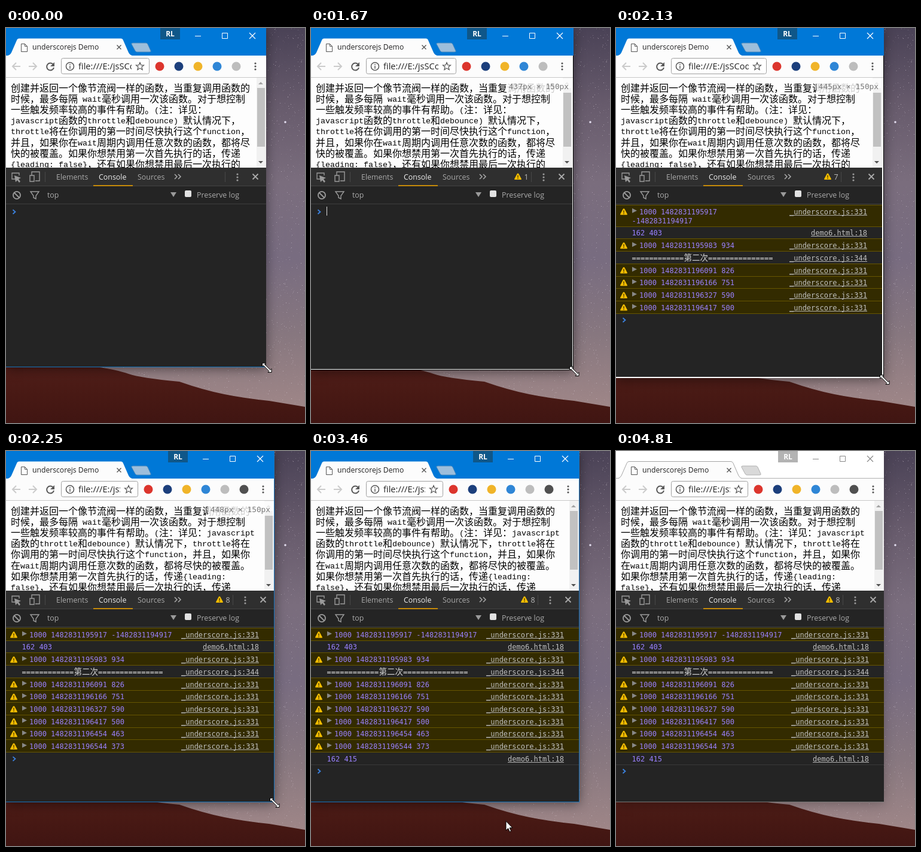
Animation, 500 px wide and 659 px high, one loop 4.91 s. Source, as an HTML page with a canvas:

```html
<!DOCTYPE html>
<html lang="zh-CN">
<head>
<meta charset="utf-8">
<title>underscorejs Demo</title>
<style>
html, body { margin: 0; width: 100%; height: 100%; overflow: hidden; background: #242424; }
canvas { display: block; }
</style>
</head>
<body>
<canvas id="stage" width="500" height="659"></canvas>
<script>
const LOOP = 4910, ROW = 20.68;
const UI = '"Open Sans", "Noto Sans", sans-serif';
const MONO = '"DejaVu Sans Mono", monospace';
const CJK = '"Noto Sans CJK SC", "Noto Sans CJK", sans-serif';
const stage = document.getElementById('stage');
let c = stage.getContext('2d');

// Window stages: start, outer width/height, toolbar width, console width/bottom, log rows, warnings
const sizes = [
  [0, 435, 566, 435, 435, 565, 0, 0],
  [1550, 438, 569, 437, 435, 565, 0, 0],
  [1670, 439, 571, 438, 437, 569, 0, 1],
  [1820, 441, 579, 440, 439, 570, 3, 2],
  [1980, 447, 583, 442, 439, 572, 5, 4],
  [2130, 448, 584, 447, 445, 582, 8, 7],
  [2250, 448, 586, 448, 448, 585, 10, 8],
  [2650, 448, 586, 448, 448, 585, 11, 8]
];
// Pointer: start, x, y, shape
const pointer = [
  [0, 436.5, 567, 'resize'], [1550, 438.5, 569, 'resize'], [1670, 440.5, 573, 'resize'],
  [1820, 442.5, 580, 'resize'], [1980, 449.5, 587, 'resize'], [2780, 442, 609, 'arrow'],
  [2920, 430, 620, 'arrow'], [3050, 400, 631, 'arrow'], [3190, 352, 638, 'arrow'],
  [3310, 325, 621, 'arrow'], [3460, 326, 617, 'arrow'], [3580, 314, 631, 'arrow'],
  [3730, 0, 0, 'none']
];
const caretFlips = [460, 1020, 1550, 2080, 2650, 3050, 3580, 4040, 4560, 4810];

const logs = ['1000 1482831195917 -1482831194917', '162 403', '1000 1482831195983 934',
  '============第二次===============', '1000 1482831196091 826', '1000 1482831196166 751',
  '1000 1482831196327 590', '1000 1482831196417 500', '1000 1482831196454 463',
  '1000 1482831196544 373', '162 415'];
const head = ['创建并返回一个像节流阀一样的函数，当重复调用函数的',
  '时候，最多每隔 wait毫秒调用一次该函数。对于想控制'];
const narrowText = [...head,
  '一些触发频率较高的事件有帮助。(注：详见：',
  'javascript函数的throttle和debounce) 默认情况下，',
  'throttle将在你调用的第一时间尽快执行这个function，',
  '并且，如果你在wait周期内调用任意次数的函数，都将尽',
  '快的被覆盖。如果你想禁用第一次首先执行的话，传递',
  '{leading: false}，还有如果你想禁用最后一次执行的'];
const wideText = [...head,
  '一些触发频率较高的事件有帮助。(注：详见：javascript',
  '函数的throttle和debounce) 默认情况下，throttle将在',
  '你调用的第一时间尽快执行这个function，并且，如果你',
  '在wait周期内调用任意次数的函数，都将尽快的被覆盖。',
  '如果你想禁用第一次首先执行的话，传递{leading:',
  'false}，还有如果你想禁用最后一次执行的话，传递'];

const latest = (list, t) => list.filter(step => step[0] <= t).pop();

function rect(x, y, w, h, color) {
  c.fillStyle = color;
  c.fillRect(x, y, w, h);
}
function text(str, x, y, font, color, align = 'left') {
  c.font = font;
  c.fillStyle = color;
  c.textAlign = align;
  c.fillText(str, x, y);
}
function trace(d, x, y) {
  const path = new Path2D();
  path.addPath(new Path2D(d), new DOMMatrix([1, 0, 0, 1, x, y]));
  return path;
}
function stroke(d, x, y, color, width = 1) {
  c.strokeStyle = color;
  c.lineWidth = width;
  c.stroke(trace(d, x, y));
}
function fill(d, x, y, color) {
  c.fillStyle = color;
  c.fill(trace(d, x, y));
}
function disc(x, y, r, color) {
  c.fillStyle = color;
  c.beginPath();
  c.arc(x, y, r, 0, 7);
  c.fill();
}
function dots(x, y, color) {
  for (const dy of [-5, 0, 5]) disc(x, y + dy, 1.6, color);
}
function clipped(x, y, w, h, draw) {
  c.save();
  c.beginPath();
  c.rect(x, y, w, h);
  c.clip();
  draw();
  c.restore();
}
function gradient(y0, y1, colors) {
  const g = c.createLinearGradient(0, y0, 0, y1);
  colors.forEach((color, i) => g.addColorStop(i / (colors.length - 1), color));
  return g;
}

function makeDesktop() {
  const canvas = document.createElement('canvas'), front = c;
  canvas.width = 500;
  canvas.height = 659;
  c = canvas.getContext('2d');
  rect(0, 0, 500, 659, gradient(0, 640, ['#4a4256', '#675b6c', '#7a6d7d', '#786c80', '#87777f', '#a08788']));
  let seed = 7;
  const random = () => (seed = seed * 16807 % 2147483647) / 2147483647;
  for (let i = 0; i < 9000; i++) {
    const x = random() * 500, y = random() * 635, a = random() ** 3 * 0.5;
    rect(x | 0, y | 0, 1, 1, `rgba(235,225,235,${a})`);
  }
  disc(467, 157, 1.8, '#e6e0f2');
  fill('M0 560 L150 565 Q185 570 205 577 T290 590 Q330 604 365 611 T440 622 L500 632 V659 H0Z', 0, 0,
    gradient(566, 659, ['#4f1d18', '#481914', '#401512']));
  c = front;
  return canvas;
}

function drawTitleBar(O, W, active) {
  rect(0, 0, O, 46, active ? '#0078d7' : '#fff');
  const ink = active ? '#fff' : '#888';
  rect(O - 119, 13, 10, 1, ink);
  stroke('M-4.5 -4.5h9v9h-9z', O - 69, 13, ink);
  stroke('M-5 -5L5 5M5 -5L-5 5', O - 23, 13, ink, 1.2);
  rect(W - 177, 0, 33, 19, active ? '#0f5789' : '#b3b3b3');
  text('RL', W - 160.5, 14, 'bold 12px ' + UI, '#fff', 'center');

  const tab = 'M3 46 Q7 45 9 41 L18 20.5 Q19 17.5 22 17.5 H192 Q195 17.5 196 20.5 L205 41 Q207 45 211 46';
  const plus = 'M212 25 H234 Q236 25 237 27 L242 38 Q243 40 240 40 H219 Q217 40 216 38 L210 27 Q209 25 212 25Z';
  fill(plus, 0, 0, active ? '#9dbedb' : '#d9d9d9');
  stroke(plus, 0, 0, active ? '#4a89bd' : '#b0b0b0');
  if (!active) rect(0, 45, O, 1, '#b0b0b0');
  fill(tab, 0, 0, '#fcfcfc');
  if (!active) stroke(tab, 0, 0, '#a5a5a5');
  fill('M25 26h7l4 4v10h-11z', 0, 0, '#fff');
  stroke('M25.5 26.5h6l4 4v9h-10zM31.5 26.5v4h4', 0, 0, '#555');
  text('underscorejs Demo', 44, 36, '12.2px ' + UI, '#222');
  stroke('M-3.5 -3.5L3.5 3.5M3.5 -3.5L-3.5 3.5', 189, 32, '#555', 1.4);
}

function drawToolbar(W, wide) {
  rect(0, 46, W, 37, '#fcfcfc');
  rect(0, 82, W, 1, '#c8c8c8');
  stroke('M7 0H-6M0 -6L-6 0L0 6', 17, 64, '#cbcbcb', 2);
  stroke('M-7 0H6M0 -6L6 0L0 6', 45, 64, '#cbcbcb', 2);
  stroke('M5 -3A6 6 0 1 0 6 2', 74, 64, '#5a5a5a', 2);
  fill('M7 -7V0H0Z', 74, 64, '#5a5a5a');

  const icons = [...(wide ? ['#505050'] : []), '#bdbdbd', '#2f86d6', '#f0b429', '#1c3f7c', '#dc352d'];
  const right = W - 36 - 32 * icons.length;
  c.beginPath();
  c.roundRect(92.5, 50.5, right - 92, 26, 3);
  c.fillStyle = '#fff';
  c.fill();
  c.strokeStyle = '#a0a0a0';
  c.lineWidth = 1;
  c.stroke();
  stroke('M6.5 0A6.5 6.5 0 1 1 6.5 -.01M0 -1V4M0 -4V-2.3', 107, 64, '#555', 1.4);
  clipped(115, 51, right - 144, 25, () => text('file:///E:/jsSCode', 121, 69, '14.6px ' + UI, '#222'));
  stroke('M0 -6.5L1.8 -2.2 6.5 -2 2.9 1 4.1 5.6 0 3.1 -4.1 5.6 -2.9 1 -6.5 -2 -1.8 -2.2Z', right - 15, 64, '#555', 1.2);
  icons.forEach((color, i) => disc(W - 50 - 32 * i, 64, 7.5, color));
  dots(W - 18, 64, '#555');
}

function drawPage(V, top, wide, overlay) {
  rect(0, 83, V, top - 83, '#fdfdfd');
  clipped(0, 83, V, top - 83, () => {
    (wide ? wideText : narrowText).forEach((line, row) => {
      let x = 8;
      for (const ch of line) {
        const latin = ch < '\x7f';
        text(ch, x, (latin ? 105 : 106) + row * 18.1, latin ? '13.33px "Liberation Mono", monospace' : '16px ' + CJK, '#000');
        x += latin ? 8 : 16;
      }
    });
    rect(V - 16, 83, 16, 150, '#f1f1f1');
    rect(V - 15, 100, 13, 98, '#c1c1c1');
    fill('M-4 2L0 -2L4 2Z', V - 9, 92, '#a3a3a3');
    fill('M-4 -2L0 2L4 -2Z', V - 9, 224, '#505050');
    if (overlay) {
      rect(V - 110, 84, 110, 24, 'rgba(255,255,255,.8)');
      text(`${V}px × ${top - 83}px`, V - 6, 102, '12.8px ' + MONO, '#777', 'right');
    }
  });
}

function warning(x, y) {
  fill('M0 -5.5Q1 -5.5 1.5 -4.5L6 4Q6 5 5 5H-5Q-6 5 -6 4L-1.5 -4.5Q-1 -5.5 0 -5.5Z', x, y, '#f4bd00');
  rect(x - 0.75, y - 2.5, 1.5, 4, '#5a4300');
  rect(x - 0.75, y + 2.3, 1.5, 1.5, '#5a4300');
}

function drawLog(str, y, height, V, wrap) {
  const warn = str.startsWith('1000'), numeric = !str.startsWith('=');
  const font = '12px ' + MONO, base = Math.round(y + 4);
  const top = Math.round(y - 11.7), bottom = Math.round(y + height - 11.7);
  if (warn) {
    rect(0, top, V, bottom - top, '#332b00');
    rect(0, top, V, 1, '#665500');
    rect(0, bottom, V, 1, '#665500');
    warning(13, y);
    fill('M0 -4L8 0L0 4Z', 27, y - 2, '#888');
  } else {
    rect(0, bottom, V, 1, '#3a3a3a');
  }
  const x = warn ? 39 : 26.5;
  if (!numeric) {
    const [left, middle, right] = str.match(/=+|[^=]+/g);
    text(left, x, base, font, '#d5d5d5');
    text(middle, 113.5, base, '13.5px ' + CJK, '#d5d5d5');
    text(right, 154, base, font, '#d5d5d5');
  } else if (wrap) {
    const cut = str.indexOf(' -');
    text(str.slice(0, cut), x, base, font, '#9980ff');
    text(str.slice(cut + 1), 26.5, base + 15, font, '#9980ff');
  } else {
    text(str, x, base, font, '#9980ff');
  }
  const link = warn ? '_underscore.js:331' : numeric ? 'demo6.html:18' : '_underscore.js:344';
  text(link, V - 25, base, font, '#c0c0c0', 'right');
  const width = c.measureText(link).width;
  rect(V - 25 - width, base + 1, width, 1, '#b0b0b0');
}

function drawConsole(V, top, bottom, rows, warnings, wide, caret) {
  const font = '12.4px ' + UI, gray = '#9a9a9a';
  rect(0, top, V, bottom - top, '#242424');
  rect(0, top, V, 30, '#2f2f2f');
  rect(0, top + 30, V, 1, '#444');
  rect(0, top + 60, V, 1, '#3d3d3d');
  const y = top + 15, y2 = top + 46;

  stroke('M4 5H-6V-5H6V-1', 16, y - 1, gray, 1.3);
  fill('M-2 -2L9 2L5 4L8 8L6 10L3 6L0 9Z', 16, y, gray);
  stroke('M-5 -2V-8H8V7H1M-8 -2H-1V8H-8Z', 48, y, gray, 1.4);
  rect(65, y - 8, 1, 17, '#484848');
  text('Elements', 84, y + 5, font, '#aaa');
  text('Console', 155, y + 5, font, '#eee');
  text('Sources', 220, y + 5, font, '#aaa');
  rect(146, top + 29, 66, 2, '#c58a0a');
  stroke('M-5 -4L-1 0L-5 4M1 -4L5 0L1 4', 287, y, '#aaa', 1.5);
  if (warnings) {
    warning(V - 91, y);
    text(warnings, V - 80.5, y + 4.5, font, '#bbb');
  }
  rect(V - 69, y - 8, 1, 17, '#484848');
  dots(V - 48, y + 1, gray);
  stroke('M-4.5 -4.5L4.5 4.5M4.5 -4.5L-4.5 4.5', V - 18, y, '#aaa', 1.8);

  stroke('M6 0A6 6 0 1 1 6 -.01M-4 -4L4 4', 18, y2, gray, 1.8);
  stroke('M-7 -6H7L2 1V6L-2 4V1Z', 48, y2, gray, 1.4);
  text('top', 69, y2 + 4, font, '#aaa');
  fill('M-5 -4H5L0 4Z', 280, y2 - 1, gray);
  c.beginPath();
  c.roundRect(299, y2 - 8, 11, 11, 2);
  c.fillStyle = '#e2e2e2';
  c.fill();
  text('Preserve log', 319, y2 + 4, font, '#aaa');

  let line = top + 73.8;
  logs.slice(0, rows).forEach((str, i) => {
    const wrap = i === 0 && !wide, height = ROW + (wrap ? 15 : 0);
    drawLog(str, line, height, V, wrap);
    line += height;
  });
  stroke('M-2 -3.5L2 0L-2 3.5', 13.5, line, '#3b82e0', 1.8);
  if (caret) rect(26, Math.round(line - 8.4), 1, 15, '#ddd');
}

function drawPointer([, x, y, shape]) {
  const shapes = {
    resize: 'M-8 -8H-2L-4 -6L5.5 3.5L7.5 1.5V7.5H1.5L3.5 5.5L-6 -4L-8 -2Z',
    arrow: 'M0 .5V16L3.7 12.6L6.2 18.3L8.6 17.2L6.2 11.7H11Z'
  };
  if (!shapes[shape]) return;
  fill(shapes[shape], x, y, '#fff');
  stroke(shapes[shape], x, y, '#000');
}

const desktop = makeDesktop();

function draw(t) {
  const [, O, H, W, V, bottom, rows, warnings] = latest(sizes, t);
  const active = t < 4810, wide = V >= 448, resizing = t >= 1550 && t < 2250;
  const top = t >= 1980 && t < 2130 ? 232 : 233;
  const caret = caretFlips.filter(flip => flip <= t).length % 2 === 1 && active;

  c.drawImage(desktop, 0, 0);
  c.save();
  c.shadowColor = active ? 'rgba(0,0,0,.45)' : 'rgba(0,0,0,.25)';
  c.shadowBlur = 18;
  c.shadowOffsetY = 3;
  rect(0, 0, O + (wide && active ? 1 : 0), H, resizing ? '#000' : active ? '#1675bd' : '#777');
  c.restore();

  rect(0, 46, W, bottom + W - V - 46, '#fff');
  drawTitleBar(O, W, active);
  drawToolbar(W, wide);
  drawPage(V, top, wide, t >= 1670 && t < 3190);
  drawConsole(V, top, bottom, rows, warnings, wide, caret);
  drawPointer(latest(pointer, t));
}

const start = performance.now();
function tick() {
  draw((performance.now() - start) % LOOP);
  requestAnimationFrame(tick);
}
tick();
</script>
</body>
</html>
```
